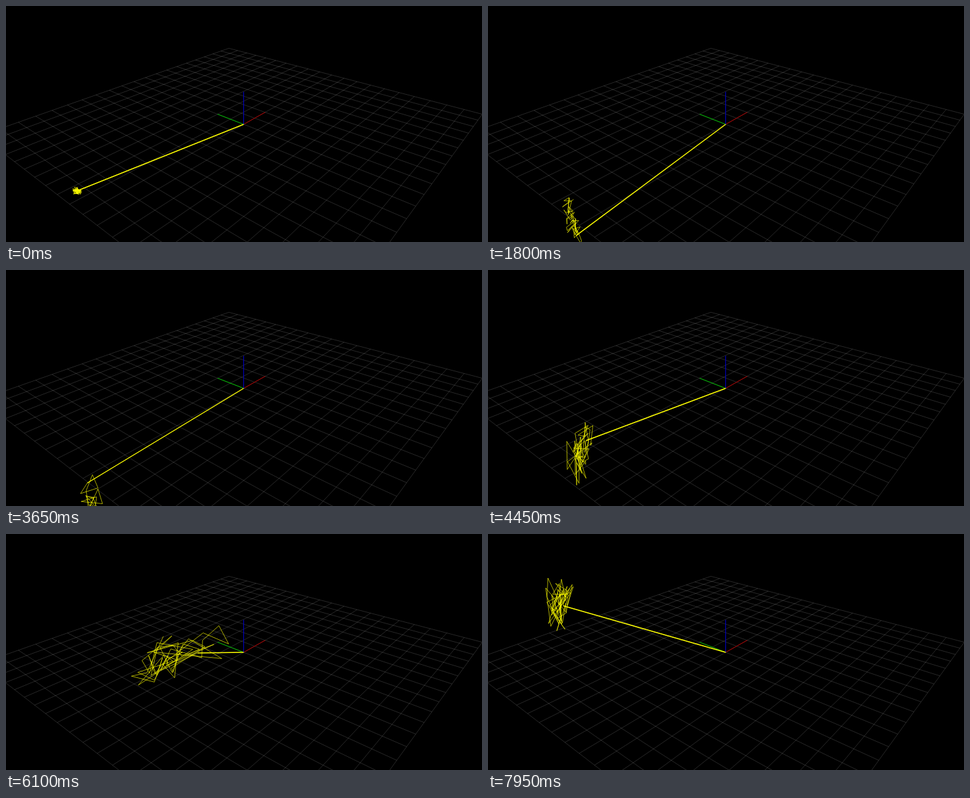
An HTML page with a canvas that plays this animation: 720 px wide and 359 px high, repeating every 8000 ms.

```html
<!DOCTYPE html>
<html lang="en">
<head>
<meta charset="utf-8">
<title>Position trace</title>
<style>
html, body { margin: 0; width: 100%; height: 100%; overflow: hidden; background: #000; }
canvas { display: block; }
</style>
</head>
<body>
<canvas id="view" width="720" height="359"></canvas>
<script>
const ctx = document.getElementById('view').getContext('2d');
const LOOP = 8000, STEP = 50;
const SAMPLE = 9, SAMPLES = 55;
const YELLOW = '#ff0';

// Orbit camera around the origin, z up
const CENTER = { x: 359.5, y: 180 }, FOCAL = 623.5, DISTANCE = 23.2;
const rad = deg => deg * Math.PI / 180;
const azimuth = rad(219.8), elevation = rad(28);
const ca = Math.cos(azimuth), sa = Math.sin(azimuth);
const ce = Math.cos(elevation), se = Math.sin(elevation);

function project(x, y, z = 0) {
  const toward = x * ca + y * sa;
  const scale = FOCAL / (DISTANCE - toward * ce - z * se);
  return [
    CENTER.x + (y * ca - x * sa) * scale,
    CENTER.y - (z * ce - toward * se) * scale
  ];
}

// Key points of the moving tip
const PATH = [
  { t: 0, x: 108, y: 281 },
  { t: 1150, x: 119, y: 286 },
  { t: 2550, x: 150, y: 422 },
  { t: 3400, x: 143, y: 400 },
  { t: 3650, x: 123, y: 324 },
  { t: 5200, x: 172, y: 199 },
  { t: 6100, x: 290, y: 181 },
  { t: 7400, x: 102, y: 101 },
  { t: 8000, x: 115, y: 110 }
];

function tipAt(time) {
  const t = Math.max(0, time);
  const next = PATH.findIndex(key => key.t > t);
  const a = PATH[next - 1], b = PATH[next];
  const u = (t - a.t) / (b.t - a.t);
  return [a.x + (b.x - a.x) * u, a.y + (b.y - a.y) * u];
}

// Seeded noise in -1..1, concentrated near zero
function noise(n, seed) {
  const s = Math.sin(n * 127.1 + seed * 311.7) * 43758.5453;
  const u = (s - Math.floor(s)) * 2 - 1;
  return u * Math.sqrt(Math.abs(u));
}

// The scatter grows over time and stretches along a slant while passing the origin
function trailPoint(n) {
  const t = n * SAMPLE;
  const [x, y] = tipAt(t);
  const growth = Math.min(1, Math.max(0, t / 5000));
  const burst = Math.exp(-(((t - 6000) / 450) ** 2));
  const dx = noise(n, 1) * (7 + 13 * growth + 35 * burst);
  const dy = noise(n, 2) * (6 + 36 * growth - 14 * burst);
  return [x + dx, y + dy - dx * .4 * burst];
}

function stroke(points, color, width) {
  ctx.beginPath();
  points.forEach(p => ctx.lineTo(...p));
  ctx.strokeStyle = color;
  ctx.lineWidth = width;
  ctx.stroke();
}

function drawScene() {
  const gray = 'rgba(255,255,255,.15)';
  for (let i = -10; i <= 10; i++) {
    stroke([project(i, -10), project(i, 10)], gray, 1);
    stroke([project(-10, i), project(10, i)], gray, 1);
  }
  const origin = project(0, 0);
  stroke([origin, project(2, 0)], '#b00000', 1);
  stroke([origin, project(0, 2)], '#00c000', 1);
  stroke([origin, project(0, 0, 2)], '#0000c8', 1);
}

function drawTrace(t) {
  const tip = tipAt(t);
  const newest = Math.floor(t / SAMPLE);
  const trail = [tip];
  for (let i = 1; i <= SAMPLES; i++) trail.push(trailPoint(newest - i));
  stroke(trail, YELLOW, .65);
  stroke([project(0, 0), tip], YELLOW, 1.4);
}

const start = performance.now();

function frame() {
  const elapsed = (performance.now() - start) % LOOP;
  ctx.clearRect(0, 0, 720, 359);
  drawScene();
  drawTrace(Math.floor(elapsed / STEP) * STEP);
  requestAnimationFrame(frame);
}

ctx.lineJoin = 'bevel';
frame();
</script>
</body>
</html>
```
